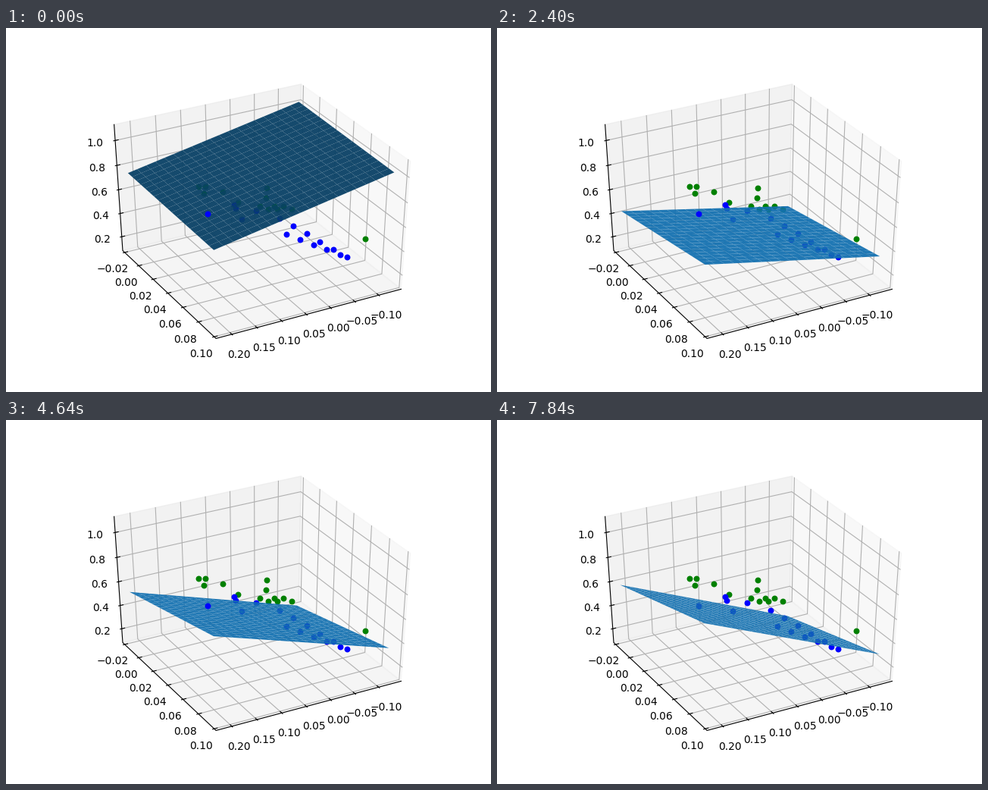
A matplotlib script for the animation above (8000 ms loop, 640 by 480 pixels).

```python
import numpy as np
import matplotlib.pyplot as plt
from matplotlib.animation import FuncAnimation
from matplotlib.collections import PolyCollection
from matplotlib.patches import Polygon, Rectangle

W, H, FRAMES, STEP = 640, 480, 50, 160
AZ, EL = np.radians(61.5), np.radians(36.5)
SA, CA, SE, CE = np.sin(AZ), np.cos(AZ), np.sin(EL), np.cos(EL)
BOX = 0.5 + 1 / 48       # half side of the drawn box; data fill +-0.5
TICK_OUT, TICK_IN, LABEL = 0.0083, 0.0167, 0.0738

fig = plt.figure(figsize=(W / 100, H / 100), dpi=100, facecolor="white")
ax = fig.add_axes([0, 0, 1, 1])
ax.set_xlim(0, W)
ax.set_ylim(H, 0)
ax.axis("off")


def nearness(x, y, z):
    return (CA * x + SA * y) * CE + SE * z


def project(x, y, z):
    """Perspective view of the unit cube centred on 0, in stage pixels."""
    dist = 10 - nearness(x, y, z)
    right = (CA * y - SA * x) / dist
    up = (CE * z - SE * (CA * x + SA * y)) / dist
    return 334.7 + 2681 * right, 237.4 - 1998 * up


def path(*points, **style):
    xs, ys = zip(*(project(*p) for p in points))
    ax.plot(xs, ys, lw=0.8, **style)


def pane(gray, *points):
    color = (gray, gray, gray, 0.5)
    ax.add_patch(Polygon([project(*p) for p in points], fc=color, ec=color,
                         lw=1, zorder=0))


def grid(*points):
    path(*points, color="#b0b0b0", zorder=1)


def tick(a, b):
    path(a, b, color="black", zorder=2)


def label(point, text):
    x, y = project(*point)
    ax.text(x, y, text.replace("-", "\u2212"), family="DejaVu Sans", size=10,
            ha="center", va="top", zorder=2)


def draw_box():
    b, out = BOX, BOX + LABEL
    far, near = BOX + TICK_OUT, BOX - TICK_IN
    pane(0.95, (-b, -b, -b), (-b, b, -b), (-b, b, b), (-b, -b, b))
    pane(0.90, (-b, -b, -b), (b, -b, -b), (b, -b, b), (-b, -b, b))
    pane(0.925, (-b, -b, -b), (b, -b, -b), (b, b, -b), (-b, b, -b))

    for v in np.arange(-2, 5) * 0.05:
        p = (v - 0.0418) / 0.3636
        grid((p, -b, b), (p, -b, -b), (p, b, -b))
        tick((p, far, -b), (p, near, -b))
        label((p, out, -out), f"{v:.2f}")
    for v in np.arange(-1, 6) * 0.02:
        p = (v - 0.0397) / 0.1201
        grid((-b, p, b), (-b, p, -b), (b, p, -b))
        tick((far, p, -b), (near, p, -b))
        label((out, p, -out), f"{v:.2f}")
    for v in np.arange(1, 6) * 0.2:
        p = (v - 0.602) / 1.005
        grid((b, -b, p), (-b, -b, p), (-b, b, p))
        tick((far, -b, p), (near, -b, p))
        label((out, -out, p), f"{v:.1f}")

    path((b, -b, b), (b, -b, -b), (b, b, -b), (-b, b, -b),
         color="black", zorder=2)


def dots(xs, ys, color):
    return ax.scatter(xs, ys, s=20, c=color, linewidths=1.2, zorder=3)


def draw_clouds():
    # Loose dots, then the row along the ridge and the falling band.
    dots([254, 263, 261, 286, 306, 344, 343, 474],
         [209, 209, 218, 216, 230, 211, 224, 278], "green")
    dots([301, 303, 311, 330], [233, 238, 252, 241], "blue")

    k = np.arange(6)
    s = k / 2.5 - 1
    dots(356 + 21 * s * np.sqrt(abs(s)), 236.5 - 2 * (-1.0) ** k, "green")

    k = np.arange(11)
    zigzag = 9 * (-1.0) ** k * (1 - k / 10)
    dots(361 + 8.9 * k, 260 + 4.2 * k - zigzag, "blue")


draw_box()
draw_clouds()
front_dot = dots([266], [245], "blue")

plane = PolyCollection([], edgecolors="none", linewidths=0, zorder=4)
ax.add_collection(plane)
plane.set_clip_path(Rectangle((80, 57.6), 496, 369.6, transform=ax.transData))

DARK = (0.037, 0.255, 0.4, 0.95)
BLUE = (0.078, 0.443, 0.694, 0.95)
CELLS, SETTLE = 19, 6

side = np.linspace(0, 1, CELLS + 1)
u, v = np.meshgrid(side, side)      # u: left to back, v: left to front
PX, PY = 0.491 - 0.966 * u, 0.92 * v - 0.46


def heights(i):
    """The fit swings wildly at first, then eases into its final tilt."""
    rest = (1 - max(0, i - SETTLE) / (FRAMES - 1 - SETTLE)) ** 1.8
    left = -0.232 * rest
    front = 0.295 - 0.401 * rest
    back = -0.45 - 0.16 * max(0, i - 15) / 34
    z = left + (back - left) * u + (front - left) * v
    if i < SETTLE:
        swing = 1.24 * (-1) ** i * np.cos(np.pi * (i - 2) / 8)
        z = z + swing * (0.45 + 0.55 * u - 0.16 * v)
    return z


def draw(i):
    z = heights(i)
    p = np.stack(project(PX, PY, z), axis=-1)
    quads = np.stack([p[:-1, :-1], p[:-1, 1:], p[1:, 1:], p[1:, :-1]], axis=2)
    plane.set_verts(quads.reshape(-1, 4, 2))
    plane.set_facecolor(DARK if i == 0 else BLUE)

    # The nearest dot is hidden once the plane's nearest corner passes it.
    front_dot.set_zorder(5 if nearness(PX, PY, z).max() < 0.63 else 3)
    return [plane, front_dot]


anim = FuncAnimation(fig, draw, frames=FRAMES, interval=STEP, repeat=True,
                     repeat_delay=0, blit=False)
plt.show()
```
